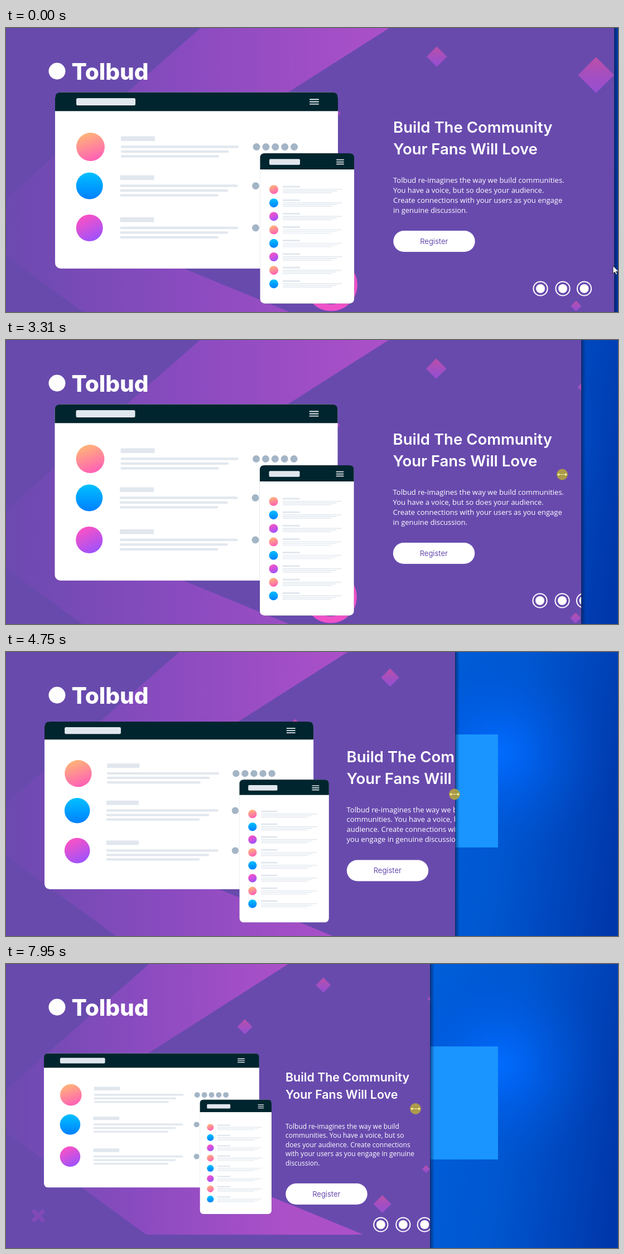
Recreate the animation shown at these times as an HTML page. Size 1097 by 510 pixels, loop 8 s.

```html
<!DOCTYPE html>
<html lang="en">
<head>
<meta charset="utf-8">
<title>Responsive landing page</title>
<style>
  html, body { margin: 0; width: 100%; height: 100%; overflow: hidden; background: #0046bc; }
  svg { display: block; width: 1097px; height: 510px; }
  .brand, .heading { font-family: Inter, sans-serif; fill: #fff; }
  .brand { font-weight: 800; font-size: 40.5px; }
  .heading { font-weight: 600; }
  .para { font-family: "Open Sans", sans-serif; fill: #fff; }
  .button { font: 13px Inter, sans-serif; fill: #674baf; text-anchor: middle; }
</style>
</head>
<body>
<script>
const LOOP = 8000;

// Page layouts, from the widest window to the narrowest.
const wide = { ox: 88, oy: 115.5, scale: 1, tx: 694, ty: 188, size: 27.5, paraGap: 90, buttonGap: 176, paraSize: 13, social: 958, bg: 1.353, bgX: 1 };
const narrow = { ox: 68, oy: 160.5, scale: .761, tx: 501.5, ty: 211, size: 21.4, paraGap: 84.5, buttonGap: 183, paraSize: 12, social: 672.5, bg: 1, bgX: 0 };
const layouts = [
  wide,
  { ...wide, ox: 87.5, tx: 693.5, social: 957, bgX: 0 },
  { ...wide, ox: 71, tx: 643.5, social: 891, bg: 1.271, bgX: 0 },
  { ...wide, ox: 69, oy: 125, scale: .951, tx: 610.5, ty: 197.5, social: 830, bg: 1.208, bgX: 0 },
  narrow,
  { ...narrow, tx: 501, social: 671.8, bg: .998 }
];

const wraps = {
  wide: ["Tolbud re-imagines the way we build communities.", "You have a voice, but so does your audience.",
    "Create connections with your users as you engage", "in genuine discussion."],
  medium: ["Tolbud re-imagines the way we build", "communities. You have a voice, but so does your",
    "audience. Create connections with your users as", "you engage in genuine discussion."],
  narrow: ["Tolbud re-imagines the way we build", "communities. You have a voice, but so",
    "does your audience. Create connections", "with your users as you engage in genuine", "discussion."]
};

// Moves: first step, last step, step count, then window edge, pointer x, pointer y, layout.
const start = [1090, 1088, 427, 0];
const moves = [
  [70, 370, 5, 1090, 1100, 248, 0],
  [570, 780, 4, 1090, 1091, 233, 0],
  [1060, 1130, 2, 1090, 1089, 232.5, 0],
  [1680, 2030, 5, 1076, 1071, 232, 0],
  [2260, 2260, 1, 1074, 1071, 232, 0],
  [2370, 2630, 4, 1070, 1060, 233, 1],
  [2770, 3050, 4, 1031, 1007, 238, 1],
  [3230, 3310, 2, 1031, 997, 241.5, 1],
  [3410, 4010, 7, 981, 963, 245, 2],
  [4090, 4420, 5, 951, 938, 248, 2],
  [4570, 4750, 3, 805, 804, 255.5, 3],
  [6750, 6750, 1, 805, 801, 255.5, 4],
  [6830, 6830, 1, 805, 797, 255.5, 4],
  [6900, 6900, 1, 805, 793, 256, 4],
  [7040, 7650, 8, 770, 751, 260, 5],
  [7800, 7800, 1, 770, 734, 260, 5],
  [7950, 7950, 1, 760, 734, 260, 5]
];

const mix = (a, b, k) => a + (b - a) * k;

function stateAt(t) {
  let state = start;
  for (const [from, to, steps, ...goal] of moves) {
    if (t < from) break;
    const gap = steps > 1 ? (to - from) / (steps - 1) : 1;
    const k = Math.min(steps, Math.floor((t - from) / gap + 1e-6) + 1) / steps;
    state = state.map((v, i) => mix(v, goal[i], k));
  }
  return state;
}

function layoutAt(position) {
  const i = Math.floor(position), a = layouts[i], b = layouts[Math.min(i + 1, 5)];
  return Object.fromEntries(Object.keys(a).map(key => [key, mix(a[key], b[key], position - i)]));
}

const rect = (x, y, w, h, fill, r = 0) => `<rect x="${x}" y="${y}" width="${w}" height="${h}" rx="${r}" fill="${fill}"/>`;
const circle = (x, y, r, fill) => `<circle cx="${x}" cy="${y}" r="${r}" fill="${fill}"/>`;
const diamond = (x, y, r) => `<path d="M${x} ${y - r}l${r} ${r}l${-r} ${r}l${-r} ${-r}z" fill="url(#diamond)"/>`;
const gradient = (id, stops, dir = "x2='0' y2='1'") => `<linearGradient id="${id}" ${dir}>` +
  stops.map((c, i) => `<stop offset="${i / (stops.length - 1)}" stop-color="${c}"/>`).join("") + "</linearGradient>";

const INK = "#00252e", PALE = "#e1e7ee";
const avatars = ["url(#orange)", "url(#blue)", "url(#pink)"];

const menu = (x, y, w, gap, h) => [0, 1, 2].map(i => rect(x, y + i * gap, w, h, PALE, .8)).join("");
const panel = (x, y, w, h, head, r) => rect(x, y, w, h, "#fff", r) +
  `<path d="M${x} ${y + head}v${r - head}q0 ${-r} ${r} ${-r}h${w - 2 * r}q${r} 0 ${r} ${r}v${head - r}z" fill="${INK}"/>`;

function cardRow(y, i) {
  const x = i ? 204.5 : 206;
  return circle(i ? 149.7 : 151.5, y, i ? 24 : 25.4, avatars[i]) + rect(x, y - 19, 61, 8.5, PALE, 1) +
    [211, 193.5, 176].map((w, n) => rect(x, y - 2.3 + n * 8.5, w, 4.2, PALE, 1.5)).join("") +
    Array.from({ length: 5 }, (_, n) => circle((i ? 447.5 : 449) + n * 16.9, y, 6.5, "#a3b5c6")).join("");
}

function phoneRow(_, i) {
  const y = 290 + i * 24.2;
  return circle(480, y, 8, avatars[i % 3]) + rect(496, y - 6.5, 31, 3, PALE, 1) +
    [106, 97, 88].map((w, n) => rect(496, y - .9 + n * 3, w, 1.4, PALE, .6)).join("");
}

const mockup = panel(88, 115.5, 507, 316.5, 33.8, 10) +
  rect(126, 126, 106, 13, PALE, 2.5) + menu(544, 127.3, 17, 4.2, 1.9) +
  [213.5, 283.5, 359].map(cardRow).join("") +
  `<rect x="454.8" y="224.4" width="170" height="271" rx="9" fill="#002a3c" opacity=".13"/>` +
  panel(455.5, 225, 168.6, 269.7, 29, 8) +
  rect(472, 235.3, 55, 10.4, PALE, 2) + menu(592, 235.8, 14, 3.9, 1.7) +
  Array.from({ length: 8 }, phoneRow).join("");

const backdrop = `<path d="M257 0H507L96 262L642 487H252L-48 268Z" fill="url(#band)"/>
  <circle cx="430" cy="341" r="30.2" fill="none" stroke="#ee52c8" stroke-width="9"/>
  <path d="M48 443l20 20m0 -20l-20 20" stroke="#824ab8" stroke-width="7"/>` +
  diamond(570, 38, 13.5) + diamond(781, 62.5, 23.8) + diamond(429, 113, 13.5) + diamond(754.5, 369, 7) + diamond(676, 432, 16);

const resizeArrow = "M-9 0l4 -4v3h10v-3l4 4l-4 4v-3h-10v3z";

document.body.innerHTML = `<svg viewBox="0 0 1097 510">
<defs>
  ${gradient("desk", ["#0060dc", "#0057d0", "#0038ac"], "gradientUnits='userSpaceOnUse' x1='700' y1='200' x2='1110' y2='260'")}
  <radialGradient id="glow" gradientUnits="userSpaceOnUse" cx="885" cy="180" r="190">
    <stop offset="0" stop-color="#006cff"/><stop offset=".25" stop-color="#0066f8" stop-opacity=".75"/>
    <stop offset="1" stop-color="#0050d0" stop-opacity="0"/>
  </radialGradient>
  ${gradient("band", ["#684aad", "#8a4bc0", "#ac50c8"], "gradientUnits='userSpaceOnUse' x1='-30' x2='507' y1='0' y2='0'")}
  ${gradient("diamond", ["#bd4fa8", "#a44fc0", "#944fd2"])}
  ${gradient("orange", ["#ffb676", "#ff5eb8"], "x1='.3' x2='.65' y2='1'")}
  ${gradient("blue", ["#00c0ff", "#0080ff"])}
  ${gradient("pink", ["#ff52c1", "#9952ff"], "x1='.25' x2='.75' y2='1'")}
  <linearGradient id="shade"><stop stop-color="#001540" stop-opacity=".55"/><stop offset="1" stop-color="#001540" stop-opacity="0"/></linearGradient>
  <clipPath id="window"><rect id="view" height="510"/></clipPath>
</defs>
${rect(0, 0, 1097, 510, "url(#desk)")}${rect(0, 0, 1097, 510, "url(#glow)")}
${rect(679, 148, 203, 203, "#1a94ff")}
<g id="shadow">${rect(0, 0, 8, 510, "url(#shade)")}${rect(-.5, 0, 1.2, 510, "#1b2950")}</g>
<g clip-path="url(#window)">
  ${rect(0, 0, 1097, 510, "#684aad")}
  <g id="backdrop">${backdrop}</g>
  ${circle(91.5, 77.5, 15, "#fff")}
  <text class="brand" x="117.5" y="93">Tolbud</text>
  <g id="mockup"><g transform="translate(-88 -115.5)">${mockup}</g></g>
  <g id="copy"></g>
  <g id="social">${[0, 40, 78.5].map(x => `<circle cx="${x}" cy="468" r="12.6" fill="none" stroke="#fff" stroke-width="2"/>` + circle(x, 468, 8, "#fff")).join("")}</g>
</g>
<path id="arrow" d="M0 0v14l3.3 -3l2.2 5l2.2 -1l-2.2 -4.8h4.5z" fill="#fff" stroke="#111" stroke-width=".8"/>
<path id="resize" d="${resizeArrow}" transform-origin="0 0" fill="#fff" stroke="#111" stroke-width=".7"/>
<g id="drag"><circle r="10" fill="#b8a83a" opacity=".86"/><path d="${resizeArrow}" fill="#fff6a8" stroke="#7d7424" stroke-width=".6"/></g>
</svg>`;

const el = id => document.getElementById(id);
const move = (id, x, y, s = 1) => el(id).setAttribute("transform", `translate(${x} ${y}) scale(${s})`);
const show = (id, on) => el(id).setAttribute("visibility", on ? "visible" : "hidden");

function copy(l, position) {
  const lines = position < 2.3 ? wraps.wide : position < 4 ? wraps.medium : wraps.narrow;
  const block = (name, rows, y, size, leading) => rows.map((row, i) =>
    `<text class="${name}" x="${l.tx}" y="${y + i * size * leading}" font-size="${size}">${row}</text>`).join("");
  const top = l.ty + l.buttonGap;
  return block("heading", ["Build The Community", "Your Fans Will Love"], l.ty, l.size, 1.43) +
    block("para", lines, l.ty + l.paraGap, l.paraSize, 1.375) +
    rect(l.tx + .3, top, 146.4, 38, "#fff", 19) +
    `<text class="button" x="${l.tx + 73.3}" y="${top + 23.7}">Register</text>`;
}

let lastPosition;
function draw() {
  const t = performance.now() % LOOP;
  const [edge, x, y, position] = stateAt(t);
  el("view").setAttribute("width", edge);
  move("shadow", edge, 0);
  if (position !== lastPosition) {
    const l = layoutAt(position);
    move("backdrop", l.bgX, 0, l.bg);
    move("mockup", l.ox, l.oy, l.scale);
    move("social", l.social, 0);
    el("copy").innerHTML = copy(l, position);
    lastPosition = position;
  }
  show("arrow", t < 370);
  show("resize", t >= 570 && t < 1680);
  show("drag", t >= 1680);
  move("arrow", x, y);
  move("resize", x, y, .85);
  move("drag", x, y, 1);
  requestAnimationFrame(draw);
}
draw();
</script>
</body>
</html>
```
